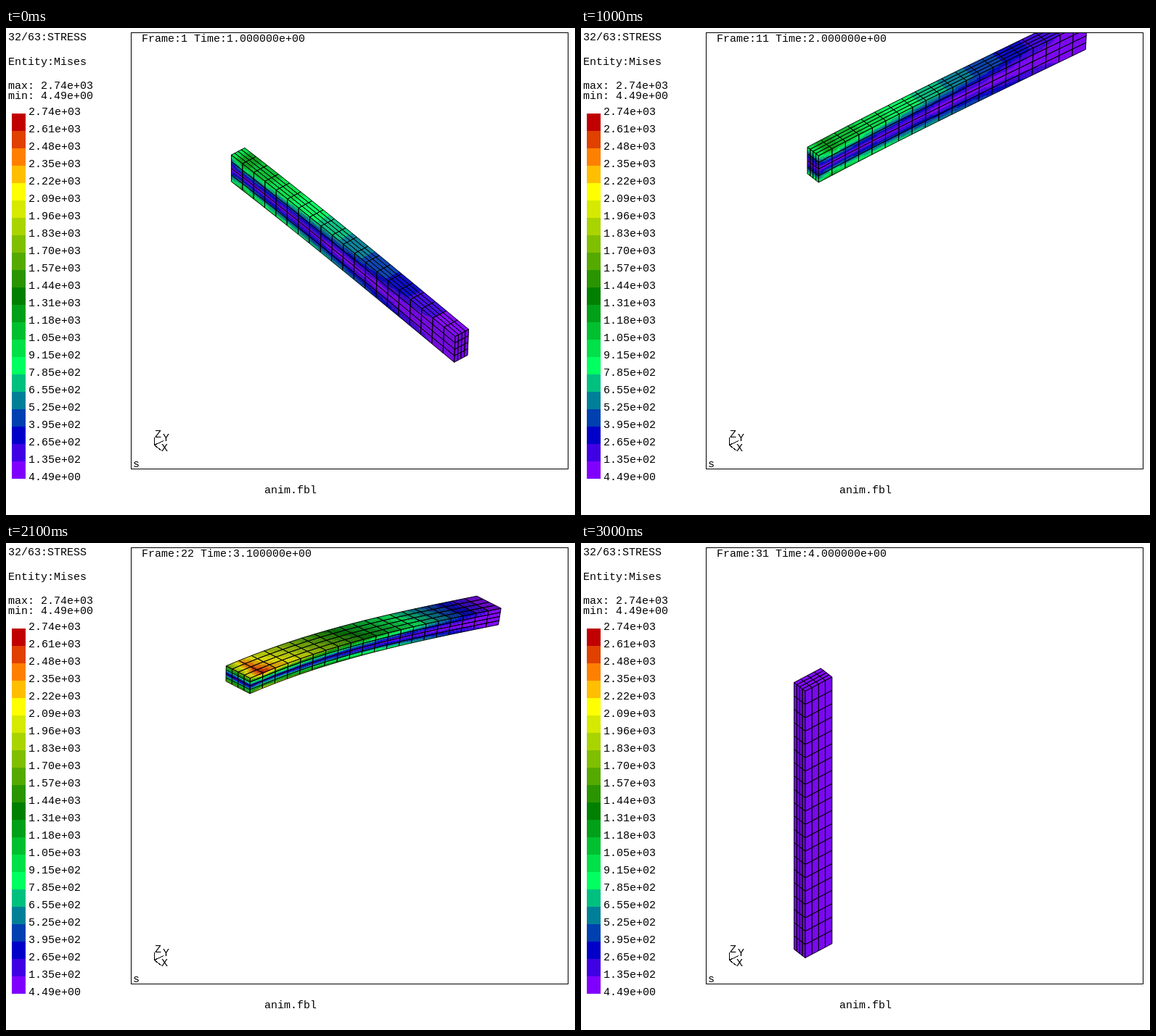
An HTML page with a canvas that plays this animation: 784 px wide and 672 px high, repeating every 3100 ms.

```html
<!DOCTYPE html>
<html lang="en">
<head>
<meta charset="utf-8">
<title>Mises stress of a turning beam</title>
<style>
  html, body { margin: 0; width: 100%; height: 100%; overflow: hidden; background: #fff; }
  svg, canvas { position: absolute; left: 0; top: 0; display: block; }
  text { font: 15px "Liberation Mono", "DejaVu Sans Mono", monospace; white-space: pre; }
  .line { fill: none; stroke: #000; shape-rendering: crispEdges; }
</style>
</head>
<body>
<canvas id="beam" width="784" height="672"></canvas>
<svg width="784" height="672" viewBox="0 0 784 672">
  <rect class="line" x="172.5" y="6.5" width="602" height="602"/>
  <text x="3" y="17">32/63:STRESS</text>
  <text x="3" y="51">Entity:Mises</text>
  <text x="3" y="84">max: 2.74e+03</text>
  <text x="3" y="98">min: 4.49e+00</text>
  <g id="legend"></g>
  <text id="title" x="187" y="19"></text>
  <path class="line" d="M204.5 565V575.5L214 583M204.5 575.5L217 569.5"/>
  <text x="205" y="565">Z</text>
  <text x="216" y="570">Y</text>
  <text x="214" y="584">X</text>
  <text x="175" y="606">s</text>
  <text x="356" y="642">anim.fbl</text>
</svg>
<script>
const MIN = 4.49, MAX = 2736.6, BANDS = 21, STEPS = 31, STEP_MS = 100;
const LENGTH = 20, SAG = 0.65, BEND = 1250, SHEAR = 30;
const CELLS = [20, 4, 4], SIZE = [1, 0.25, 0.5], SPLIT = 5;
const SCALE2 = 590;

const palette = ['8000ff', '4000e4', '0000c8', '0040b0', '008098', '00c080', '00ff60',
  '00e048', '00c030', '00a018', '008000', '2a9500', '55aa00', '80bf00', 'aad400',
  'd5ea00', 'ffff00', 'ffbf00', 'ff8000', 'e04000', 'c00000']
  .map(h => [0, 2, 4].map(i => parseInt(h.substr(i, 2), 16)));

// Rotation vectors of the clamped end at t = 1, 2, 3, 4
const THIRD = 2 * Math.PI / 3 / Math.sqrt(3);
const turns = [[0, 0, 0], [0, 0, Math.PI / 2], [THIRD, THIRD, THIRD], [-THIRD, THIRD, THIRD]];

const ctx = document.getElementById('beam').getContext('2d');
const title = document.getElementById('title');
const mix = (a, b, t) => a + (b - a) * t;
const rgb = (c, shade = 1) => `rgb(${c.map(v => Math.round(v * shade)).join()})`;
const sci = (v, digits) => v.toExponential(digits).replace(/e([+-])(\d)$/, 'e$10$2');

function buildLegend() {
  let out = '';
  for (let i = 0; i <= BANDS; i++) {
    const y = 622 - 24 * i;
    if (i < BANDS) out += `<rect x="8" y="${y - 24}" width="19" height="24" fill="${rgb(palette[i])}"/>`;
    out += `<text x="31" y="${y + 2}">${sci(mix(MIN, MAX, i / BANDS), 2)}</text>`;
  }
  document.getElementById('legend').innerHTML = out;
}

// Images of the three axes under a rotation vector (Rodrigues)
function rotate(rv) {
  const angle = Math.hypot(...rv);
  const [x, y, z] = rv.map(v => angle ? v / angle : 0);
  const c = Math.cos(angle), s = Math.sin(angle), k = 1 - c;
  return [
    [c + k * x * x, s * z + k * x * y, -s * y + k * x * z],
    [-s * z + k * x * y, c + k * y * y, s * x + k * y * z],
    [s * y + k * x * z, -s * x + k * y * z, c + k * z * z]
  ];
}

const project = ([x, y, z]) =>
  [319.7 + 15.4 * x + 18.45 * y, 188.7 + 11.9 * x - 9.8 * y - 18.4 * z];

// Cantilever under its weight, on a grid along length, width and height
function makeBeam(time) {
  const part = Math.min(2, Math.floor(time - 1 + 1e-6));
  const rv = turns[part].map((v, i) => mix(v, turns[part + 1][i], time - 1 - part));
  const [along, wide, high] = rotate(rv);
  const gw = wide[2], gh = high[2];
  const dw = -4 * SAG * gw, dh = -SAG * gh;
  const shrink = 0.6 * (dw * dw + dh * dh) / LENGTH;

  const point = ([s, j, k]) => {
    const xi = s / LENGTH, u = j / 2 - 1, v = k / 2 - 1;
    const shape = (3 * xi * xi - xi ** 3) / 2;
    const slope = (3 * xi - 1.5 * xi * xi) / LENGTH;
    const a = s - shrink * xi - (v * dh + u / 2 * dw) * slope;
    const b = u / 2 + dw * shape, c = v + dh * shape;
    return project(along.map((l, i) => a * l + b * wide[i] + c * high[i]));
  };

  const stress = ([s, j, k]) => {
    const u = j / 2 - 1, v = k / 2 - 1;
    const arm = s === 0 ? 0.75 : s === 1 ? 1.02 : 1 - s / LENGTH;
    return MIN + Math.hypot(BEND * arm * (v * gh + 2 * u * gw), SHEAR * Math.hypot(gw, gh));
  };
  return { point, stress };
}

function trace(pts) {
  ctx.moveTo(...pts[0]);
  for (const p of pts.slice(1)) ctx.lineTo(...p);
  ctx.closePath();
}

const quad = (at, a, b, c, d) => [at(a, b), at(c, b), at(c, d), at(a, d)];

function area(q) {
  const ax = q[2][0] - q[0][0], ay = q[2][1] - q[0][1];
  const bx = q[3][0] - q[1][0], by = q[3][1] - q[1][1];
  return (ax * by - ay * bx) / 2;
}

function fillCell(at, load, i, j, shade) {
  const [s00, s10, s11, s01] = quad(load, i, j, i + 1, j + 1);
  for (let a = 0; a < SPLIT; a++) for (let b = 0; b < SPLIT; b++) {
    const p = (a + 0.5) / SPLIT, q = (b + 0.5) / SPLIT;
    const value = mix(mix(s00, s10, p), mix(s01, s11, p), q);
    const band = Math.floor((value - MIN) / (MAX - MIN) * BANDS);
    ctx.fillStyle = ctx.strokeStyle = rgb(palette[Math.max(0, Math.min(BANDS - 1, band))], shade);
    ctx.beginPath();
    trace(quad(at, i + a / SPLIT, j + b / SPLIT, i + (a + 1) / SPLIT, j + (b + 1) / SPLIT));
    ctx.fill();
    ctx.stroke();
  }
}

function drawBeam(time) {
  const { point, stress } = makeBeam(time);
  const cells = [];
  ctx.clearRect(0, 0, 784, 672);
  ctx.save();
  ctx.beginPath();
  ctx.rect(173, 7, 601, 601);
  ctx.clip();
  ctx.lineJoin = 'round';
  ctx.lineWidth = 0.5;
  for (let axis = 0; axis < 3; axis++) for (const end of [0, 1]) {
    let p = (axis + 1) % 3, q = (axis + 2) % 3;
    if (!end) [p, q] = [q, p];
    const grid = (a, b) => {
      const g = [0, 0, 0];
      g[axis] = end * CELLS[axis];
      g[p] = a;
      g[q] = b;
      return g;
    };
    const at = (a, b) => point(grid(a, b));
    const load = (a, b) => stress(grid(a, b));
    for (let i = 0; i < CELLS[p]; i++) for (let j = 0; j < CELLS[q]; j++) {
      const cell = quad(at, i, j, i + 1, j + 1);
      const facing = -area(cell) / (SCALE2 * SIZE[p] * SIZE[q]);
      if (facing <= 0) continue;
      fillCell(at, load, i, j, Math.min(1, 0.5 + 0.75 * facing));
      cells.push(cell);
    }
  }
  // One path, so that shared edges are not darkened twice
  ctx.strokeStyle = '#000';
  ctx.lineWidth = 0.9;
  ctx.beginPath();
  cells.forEach(trace);
  ctx.stroke();
  ctx.restore();
}

let shown = -1;
function tick() {
  const step = Math.floor(performance.now() / STEP_MS) % STEPS;
  if (step !== shown) {
    shown = step;
    const time = 1 + step / 10;
    title.textContent = `Frame:${step + 1} Time:${sci(time, 6)}`;
    drawBeam(time);
  }
  requestAnimationFrame(tick);
}

buildLegend();
tick();
</script>
</body>
</html>
```
